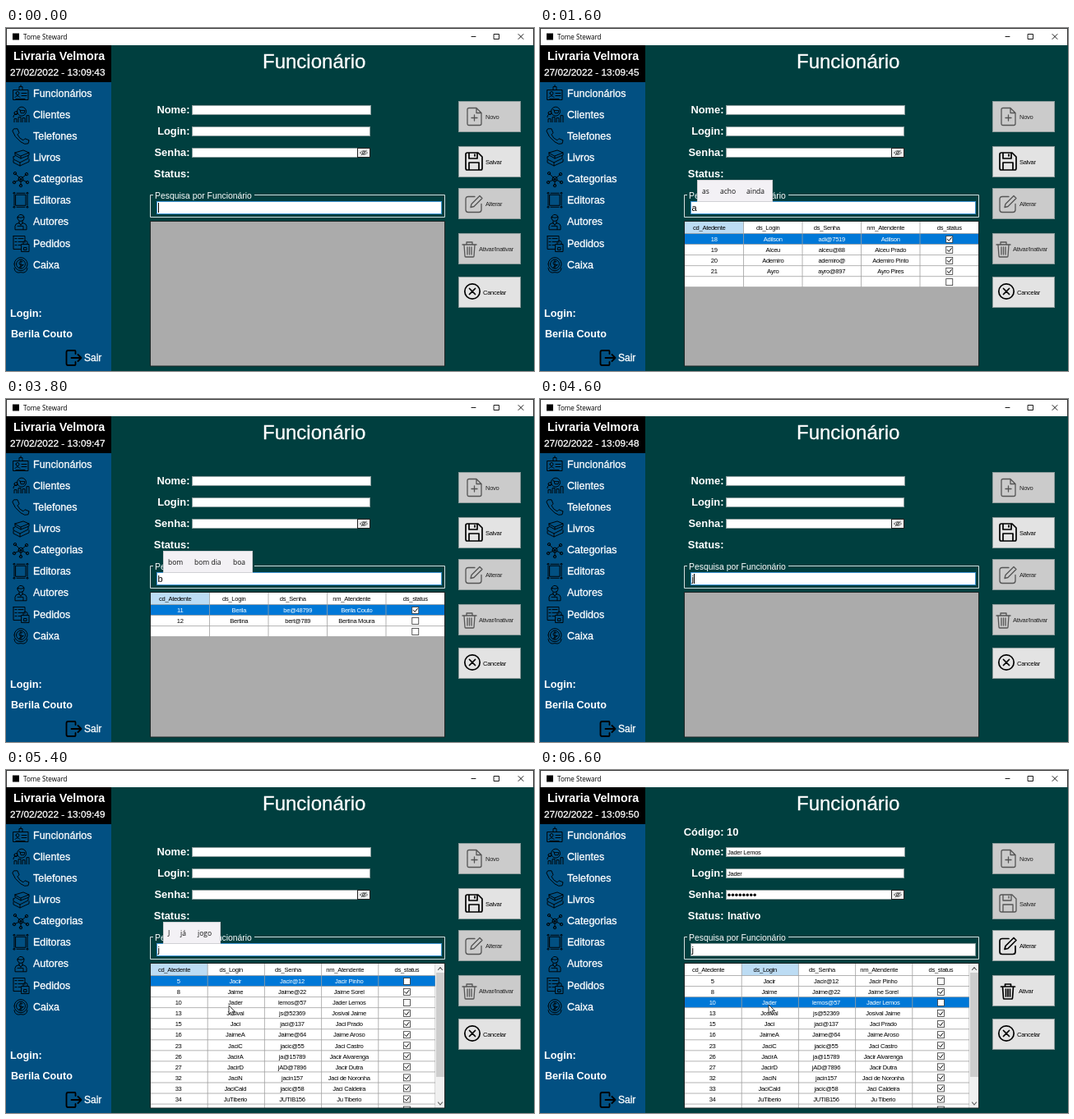
Recreate the animation shown at these times as an HTML page. Size 642x418 px, loop 6.7 s.

```html
<!DOCTYPE html>
<html lang="pt-BR">
<head>
<meta charset="utf-8">
<title>Tome Steward</title>
<style>
  html, body { margin: 0; width: 100%; height: 100%; overflow: hidden; background: #003f3f; }
  svg { display: block; font-family: "Liberation Sans", Arial, sans-serif; }
  .bold { font-weight: bold; }
  .heavy { stroke: #fff; stroke-width: .3px; }
  .small { font-size: 7.6px; letter-spacing: -.3px; }
  .ui { font-family: "Open Sans", "Noto Sans", sans-serif; }
  .icon { fill: none; stroke: #000; stroke-linecap: round; stroke-linejoin: round; }
</style>
</head>
<body>
<svg width="642" height="418" viewBox="0 0 642 418">
  <defs><clipPath id="gridClip"><rect x="176" y="236" width="358" height="176"/></clipPath></defs>
  <g id="base"></g>
  <g id="live"></g>
  <g id="pointer"><path d="M0 0V10.5L2.5 8.2 4.2 12 5.9 11.2 4.2 7.6H7.6Z" fill="#fff" stroke="#111" stroke-width=".8"/></g>
</svg>
<script>
const LOOP = 6700, STEP = 100, BLINK = 530;
const $ = id => document.getElementById(id);

const rect = (x, y, w, h, fill, extra = "") =>
  `<rect x="${x}" y="${y}" width="${w}" height="${h}" fill="${fill}" ${extra}/>`;
const text = (x, y, str, size, fill = "#fff", cls = "", anchor = "start") =>
  `<text x="${x}" y="${y}" font-size="${size}" fill="${fill}" class="${cls}" text-anchor="${anchor}">${str}</text>`;
const small = (x, y, str, fill = "#000", anchor = "start") => text(x, y, str, 7.6, fill, "small", anchor);
const icon = (x, y, d, width = .95, color = "#000") =>
  `<path class="icon" transform="translate(${x} ${y})" d="${d}" style="stroke:${color};stroke-width:${width}"/>`;
const circle = (x, y, r) => `M${x - r} ${y}a${r} ${r} 0 1 0 ${2 * r} 0a${r} ${r} 0 1 0 ${-2 * r} 0`;

const menu = [
  ["Funcionários", "M1 6H19V18H1ZM8 6V2H12V6M10 2V0" + circle(6, 10, 2) + "M3 15Q6 11 9 15M11 10H17M11 13H17M4 17H15"],
  ["Clientes", circle(11, 6, 5.5) + "M8 4H9L10 8H14L15 5H9.5M2 19V15H5V19M7 19V13H10V19M12 19V14H15V19M17 19V11H20V19M1 13Q1 9 5 9" + circle(4, 8, 2)],
  ["Telefones", "M2 1L6 1 8 6 6 8Q8 13 13 15L15 13 20 15 19 19Q15 21 10 17Q2 11 0 4Z"],
  ["Livros", "M3 4L13 1 20 4 10 8ZM3 4V7L10 11 20 7V4M10 8V11M1 9L3 8M1 9V12L9 16 19 11V8M1 13V16L9 20 20 15V12M9 16V20"],
  ["Categorias", circle(10, 10, 3) + [[3, 3], [17, 4], [2, 14], [18, 14], [10, 18]].map(([x, y]) =>
    circle(x, y, 1.7) + `M${x} ${y}L10 10`).join("")],
  ["Editoras", "M4 3H16V16H4Z" + [[2, 1], [18, 1], [2, 18], [18, 18]].map(([x, y]) => circle(x, y, 1)).join("") +
    "M2 3V16M18 3V16M5 1H15M5 18H15"],
  ["Autores", circle(10, 5, 4) + "M6 4Q10 6 14 4M8 9V12M12 9V12M3 19V15Q3 12 8 11L10 14 12 11Q17 12 17 15V19ZM6 15H13V19"],
  ["Pedidos", "M1 1H15V9M1 1V17H10M3 4H5M7 4H13M3 8H5M7 8H13M3 12H5M7 12H10M11 11H20V20H11ZM13 11V8Q15.500 5 18 8V11M14 15H17V18H14Z"],
  ["Caixa", circle(10, 9, 8) + circle(10, 9, 5.5) + "M12 6Q8 5 8 8T12 10 8 13M10 5V14M2 14Q3 21 10 19Q17 21 18 14"],
];

const icons = {
  file: "M2 0H11L17 6V19Q17 21 15 21H2Q0 21 0 19V2Q0 0 2 0ZM11 0V6H17M8.500 8.500V15.500M5 12H12",
  disk: "M2 0H15L20 5V19Q20 21 18 21H2Q0 21 0 19V2Q0 0 2 0ZM4 0V7H14V0M4 21V12H16V21M11 2V4",
  edit: "M11 2H3Q0 2 0 5V18Q0 21 3 21H16Q19 21 19 18V11M6 15L7 11 17 1 20 4 10 14Z",
  trash: "M0 4H17M5 4V1H12V4M2 4L3 18Q3 19 4 19H13Q14 19 14 18L15 4M6 7V16M8.500 7V16M11 7V16",
  cancel: circle(9.5, 9.5, 9.2) + "M6 6L13 13M13 6L6 13",
  exit: "M11 5V2Q11 1 10 1H2Q0 1 0 3V17Q0 19 2 19H10Q11 19 11 18V15M6 10H18M14 6L18 10 14 14",
};

const tables = {
  a: ["18|Adilson|adi@7519|Adilson|1", "19|Alceu|alceu@88|Alceu Prado|1",
      "20|Ademiro|ademiro@|Ademiro Pinto|1", "21|Ayro|ayro@897|Ayro Pires|1", "||||0"],
  b: ["11|Berila|be@48799|Berila Couto|1", "12|Bertina|bert@789|Bertina Moura|0", "||||0"],
  j: ["5|Jacir|Jacir@12|Jacir Pinho|0", "8|Jaime|Jaime@22|Jaime Sorel|1", "10|Jader|lemos@57|Jader Lemos|0",
      "13|Josival|js@52369|Josival Jaime|1", "15|Jaci|jaci@137|Jaci Prado|1", "16|JaimeA|Jaime@64|Jaime Aroso|1",
      "23|JaciC|jacic@55|Jaci Castro|1", "26|JacirA|ja@15789|Jacir Alvarenga|1", "27|JacirD|jAD@7896|Jacir Dutra|1",
      "32|JaciN|jacin157|Jaci de Noronha|1", "33|JaciCald|jacic@58|Jaci Caldeira|1",
      "34|JuTiberio|JUTIB156|Ju Tiberio|1", "1002|JacirMour|jacir@59|Jacir Moura|1"],
};
const headers = ["cd_Atedente", "ds_Login", "ds_Senha", "nm_Atendente", "ds_status"];

// popup: width, then word and x pairs
const popups = {
  a: [92, ["as", 197], ["acho", 219], ["ainda", 251]],
  b: [109, ["bom", 197], ["bom dia", 229], ["boa", 276]],
  j: [70, ["J", 197], ["já", 212], ["jogo", 233]],
};
const caretShift = { "": 0, a: 5.5, b: 5.5, j: 2 };

// time, typed text, table, popup, record chosen
const steps = [
  [0, "", "", "", false],
  [900, "a", "", "", false],
  [1000, "a", "a", "", false],
  [1200, "a", "a", "a", false],
  [2000, "", "", "", false],
  [2200, "b", "", "", false],
  [2300, "b", "b", "", false],
  [2600, "b", "b", "b", false],
  [4400, "", "", "", false],
  [4600, "j", "", "", false],
  [4700, "j", "j", "", false],
  [4900, "j", "j", "j", false],
  [5900, "j", "j", "", true],
];
const pointerPath = [[5000, 262, 238], [5400, 271, 287], [5800, 278, 286]];

function drawBase() {
  let s = rect(0, 0, 642, 418, "#003f3f") + rect(.5, .5, 641, 20.5, "#fff") + rect(0, 21, 128, 397, "#025082") +
    `<path d="M.5 21V.5H641.500V21" fill="none" stroke="#333"/>` +
    rect(0, 21, 128, 45, "#000") + rect(8, 6.5, 8, 8, "#000") + text(21, 14, "Tome Steward", 8.1, "#000", "ui") +
    icon(566, 10.5, "M0 0H5", .9) + icon(593.5, 7.5, "M0 0H6V6H0Z", .9) + icon(623, 7.5, "M0 0L6 6M6 0L0 6", .9) +
    text(9, 38.5, "Livraria Velmora", 14.3, "#fff", "bold") + text(312, 49, "Funcionário", 24, "#fff", "heavy");
  menu.forEach(([label, d], i) => {
    const y = 79 + i * 26.15;
    s += icon(8, y - 9.5, d) + text(33, y + 4.5, label, 12.5, "#fff", "heavy");
  });
  s += text(5, 352, "Login:", 12.7, "#fff", "bold") + text(6, 377, "Berila Couto", 12.6, "#fff", "bold") +
    icon(73.5, 392, icons.exit, 1.8) + text(95, 406, "Sair", 12, "#fff", "heavy");
  ["Nome:", "Login:", "Senha:", "Status:"].forEach((label, i) => {
    s += text(223.5, 103.5 + i * 26, label, 12.9, "#fff", "bold", "end");
    if (i < 3) s += rect(226.5, 94.5 + i * 26, i ? 216 : 217, 11, "#fff", 'stroke="#8a9c9c"');
  });
  s += rect(427.5, 146.5, 15, 11, "#f0f0f0", 'stroke="#222"') +
    icon(430.5, 148, "M0 4Q4.500 -1 9 4Q4.500 9 0 4M1.500 7L8 1" + circle(4.5, 4, 1.6), .7, "#333") +
    `<path d="M179 203.500H175.500V230.500H533.500V203.500H302" fill="none" stroke="#d5dede"/>` +
    text(181, 207.5, "Pesquisa por Funcionário", 10.4);
  return s;
}

function drawButton(y, label, iconName, enabled, iconX, labelX, iconY) {
  const color = enabled ? "#000" : "#555";
  return rect(550.5, y + .5, 75, 37, enabled ? "#e3e3e3" : "#cbcbcb", 'stroke="#8d9c9c"') +
    icon(iconX, iconY, icons[iconName], enabled ? 1.7 : 1.3, color) + small(labelX, y + 21.5, label, enabled ? "#000" : "#222");
}

function drawButtons(chosen) {
  return drawButton(89, "Novo", "file", false, 561, 583, 97.5) +
    drawButton(144, "Salvar", "disk", !chosen, 559, 583, 152) +
    drawButton(195, "Alterar", "edit", chosen, 559, 583, 203.5) +
    (chosen ? drawButton(250, "Ativar", "trash", true, 560.5, 582, 260)
            : drawButton(250, "Ativar/Inativar", "trash", false, 555, 575, 260)) +
    drawButton(303, "Cancelar", "cancel", true, 557.5, 580, 311.5);
}

function drawCheck(x, y, on) {
  return rect(x - 4, y - 4, 8, 8, "#fff", 'stroke="#333" stroke-width=".8"') +
    (on === "1" ? icon(x - 2.5, y - 2, "M0 2L2 4 5 0", 1) : "");
}

function drawGrid(name, chosen) {
  let s = rect(176, 236, 358, 176, "#ababab");
  if (name) {
    const rows = tables[name], scrolls = name === "j";
    const width = scrolls ? 346 : 357.5, col = width / 5, pitch = 13.05, top = 250.5;
    const picked = chosen ? 2 : 0, bottom = top + rows.length * pitch;
    s += rect(176, 236, width, bottom - 236, "#fff") + rect(176 + (chosen ? col : 0), 236, col, top - 236, "#bcdcf4") +
      rect(176, top + picked * pitch, width, pitch, "#0078d7");
    headers.forEach((label, i) => {
      const x = 176 + (i + .5) * col;
      s += small(x - (i < 4 ? 6 : 0), 246.3, label, "#000", "middle");
    });
    rows.forEach((row, r) => {
      const y = top + (r + .5) * pitch;
      row.split("|").forEach((cell, i) => {
        const x = 176 + (i + .5) * col - (scrolls && i < 4 ? 1 : 0);
        s += i < 4 ? small(x, y + 3.2, cell, r === picked ? "#fff" : "#000", "middle") : drawCheck(x, y + .4, cell);
      });
    });
    let lines = "";
    for (let r = 0; r <= rows.length; r++) lines += `M176 ${top + r * pitch}h${width}`;
    for (let i = 1; i <= 5; i++) lines += `M${176 + i * col} 236V${bottom}`;
    s += `<path d="${lines}" stroke="#a0a0a0" stroke-width=".8" fill="none"/>`;
    if (scrolls) s += rect(522, 236, 12, 176, "#f0f0f0") + rect(523, 247, 10, 127, "#cdcdcd") +
      icon(525.5, 240.5, "M0 3L2.500 0 5 3", 1.1, "#505050") + icon(525.5, 405, "M0 0L2.500 3 5 0", 1.1, "#505050");
  }
  return `<g clip-path="url(#gridClip)">${s}</g>` + rect(175.5, 235.5, 358, 176.5, "none", 'stroke="#1c2626"');
}

function drawRecord() {
  let s = text(223.5, 80, "Código:", 12.9, "#fff", "bold", "end") + text(227, 80, "10", 12.9, "#fff", "bold") +
    small(228, 102.7, "Jader Lemos") + small(228, 128.7, "Jader") + text(228, 181.5, "Inativo", 12.5, "#fff", "bold");
  for (let i = 0; i < 8; i++) s += `<circle cx="${230 + i * 4.45}" cy="152.300" r="1.700"/>`;
  return s;
}

function drawPopup(name) {
  const [width, ...words] = popups[name];
  return rect(191.5, 185.500, width - 1, 26, "#f3f1f5", 'stroke="#d0d0d4"') +
    words.map(([word, x]) => text(x, 201.5, word, 8.5, "#111", "ui")).join("");
}

function drawLive(seconds, caret, [, typed, table, popup, chosen]) {
  return text(5, 57.5, `27/02/2022 - 13:09:${seconds}`, 11.8, "#fff", "heavy") +
    rect(183.5, 211.5, 346, 15, "#fff", `stroke="${chosen ? "#8a9c9c" : "#3f93d2"}"`) +
    text(184.5, 222.7, typed, 11, "#000") +
    (caret ? rect(185 + caretShift[typed], 213, 1, 12, "#000") : "") +
    drawGrid(table, chosen) + drawButtons(chosen) + (chosen ? drawRecord() : "") + (popup ? drawPopup(popup) : "");
}

function movePointer(t) {
  const shown = t >= pointerPath[0][0];
  $("pointer").setAttribute("visibility", shown ? "visible" : "hidden");
  if (!shown) return;
  const next = pointerPath.findIndex(p => p[0] > t);
  let [, x, y] = pointerPath[pointerPath.length - 1];
  if (next > 0) {
    const [t0, x0, y0] = pointerPath[next - 1], [t1, x1, y1] = pointerPath[next];
    const k = 1 - (1 - (t - t0) / (t1 - t0)) ** 2;
    x = x0 + (x1 - x0) * k;
    y = y0 + (y1 - y0) * k;
  }
  $("pointer").setAttribute("transform", `translate(${x} ${y})`);
}

let lastKey = "";
function frame() {
  const t = Math.floor(performance.now() % LOOP / STEP) * STEP;
  const index = steps.filter(s => s[0] <= t).length - 1, step = steps[index];
  const typedAt = steps.find((s, i) => i <= index &&
    steps.slice(i, index + 1).every(other => other[1] === step[1]))[0];
  const seconds = 43 + Math.floor((t + 800) / 1000);
  const caret = !step[4] && Math.floor((t - typedAt) / BLINK) % 2 === 0;
  const key = [seconds, index, caret].join();
  if (key !== lastKey) $("live").innerHTML = drawLive(seconds, caret, step);
  lastKey = key;
  movePointer(t);
  requestAnimationFrame(frame);
}

$("base").innerHTML = drawBase();
frame();
</script>
</body>
</html>
```
